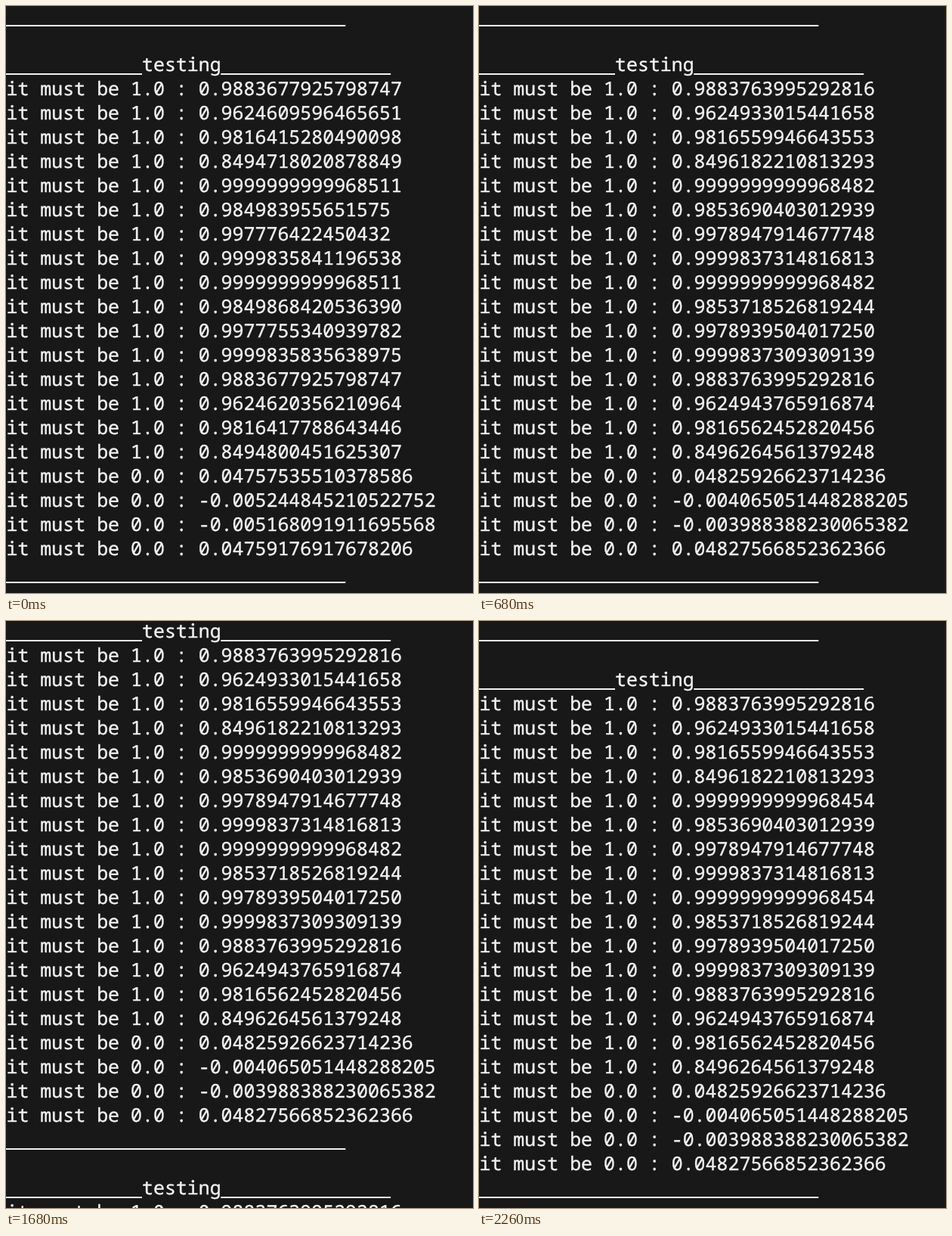
Animation of 618 by 776 pixels, one loop 2.54 s. Source, as an HTML page:

```html
<!DOCTYPE html>
<html lang="en">
<head>
<meta charset="utf-8">
<title>Terminal output</title>
<style>
  html, body { margin: 0; width: 100%; height: 100%; overflow: hidden; background: #181818; }
  svg { display: block; width: 618px; height: 776px; }
  text {
    font: 24.93px "Noto Sans Mono", "DejaVu Sans Mono", monospace;
    text-rendering: geometricPrecision;
    white-space: pre;
    stroke: #f2f2f2;
    stroke-width: 0.4px;
  }
</style>
</head>
<body>
<svg viewBox="0 0 618 776">
  <rect width="618" height="776" fill="#181818"/>
  <g id="log" fill="#f2f2f2"></g>
</svg>
<script>
const ROW = 32, COL = 14.96, BASE = 22, LOOP = 2540;
const BLOCK = 23; // rows per test run

// Per run: eight results near 1, then two near 0; the rest mirror these.
const runs = [
  [0.9883677925798747, 0.9624609596465651, 0.9816415280490098, 0.8494718020878849,
   0.9999999999968511, 0.984983955651575, 0.997776422450432, 0.9999835841196538,
   0.04757535510378586, -0.005244845210522752],
  [0.9883895123735861, 0.962534546109414, 0.9816765236001844, 0.8497713356922834,
   0.9999999999968495, 0.9853509380401837, 0.9978921297605841, 0.9999837159278187,
   0.04878787686748559, -0.004054449342986435],
  [0.9883763995292816, 0.9624933015441658, 0.9816559946643553, 0.8496182210813293,
   0.9999999999968482, 0.9853690403012939, 0.9978947914677748, 0.9999837314816813,
   0.04825926623714236, -0.004065051448288205]
];
runs.push(runs[2].with(4, 0.9999999999968454));

// Relative step from each result to its mirrored partner.
const drift = [0, 2.8662814e-5, 1.3662103e-5, 5.4761e-5,
  0, 1.922212e-4, -3.9951674e-4, -3.38548e-5, 1.7233986e-5, 7.635284e-5];

function results(run) {
  const twin = run.map((v, i) =>
    drift[i] ? (v + (1 - v) * drift[i]).toPrecision(16) : v);
  return [
    ...run.slice(0, 8), ...twin.slice(4, 8), ...twin.slice(0, 4),
    ...run.slice(8), twin[9], twin[8]
  ];
}

// [start in ms, first visible row]
const steps = [
  [0, 0], [70, BLOCK], [680, 2 * BLOCK],
  [1460, 2 * BLOCK + 1], [1680, 2 * BLOCK + 2], [1760, 2 * BLOCK + 3],
  [1840, 3 * BLOCK]
];

const log = document.getElementById("log");

function add(tag, attrs, content = "") {
  const el = document.createElementNS(log.namespaceURI, tag);
  for (const key in attrs) el.setAttribute(key, attrs[key]);
  el.textContent = content;
  log.append(el);
}

const write = (row, col, str) => add("text", { x: col * COL, y: BASE + row * ROW }, str);

const rule = (row, col, count) => add("rect", {
  x: col * COL - 0.5, y: BASE + 3 + row * ROW, width: count * COL + 0.5, height: 2
});

runs.forEach((run, n) => {
  const top = n * BLOCK;
  rule(top, 0, 30);
  rule(top + 2, 0, 12);
  write(top + 2, 12, "testing");
  rule(top + 2, 19, 15);
  results(run).forEach((value, i) => {
    write(top + 3 + i, 0, `it must be ${i < 16 ? "1.0" : "0.0"} : ${value}`);
  });
});
rule(runs.length * BLOCK, 0, 30);

function draw(ms) {
  const t = ms % LOOP;
  const [, first] = steps.findLast(([start]) => t >= start);
  log.setAttribute("transform", `translate(0.5 ${-first * ROW})`);
}

const begin = performance.now();
function tick() {
  draw(performance.now() - begin);
  requestAnimationFrame(tick);
}
draw(0);
requestAnimationFrame(tick);
</script>
</body>
</html>
```
